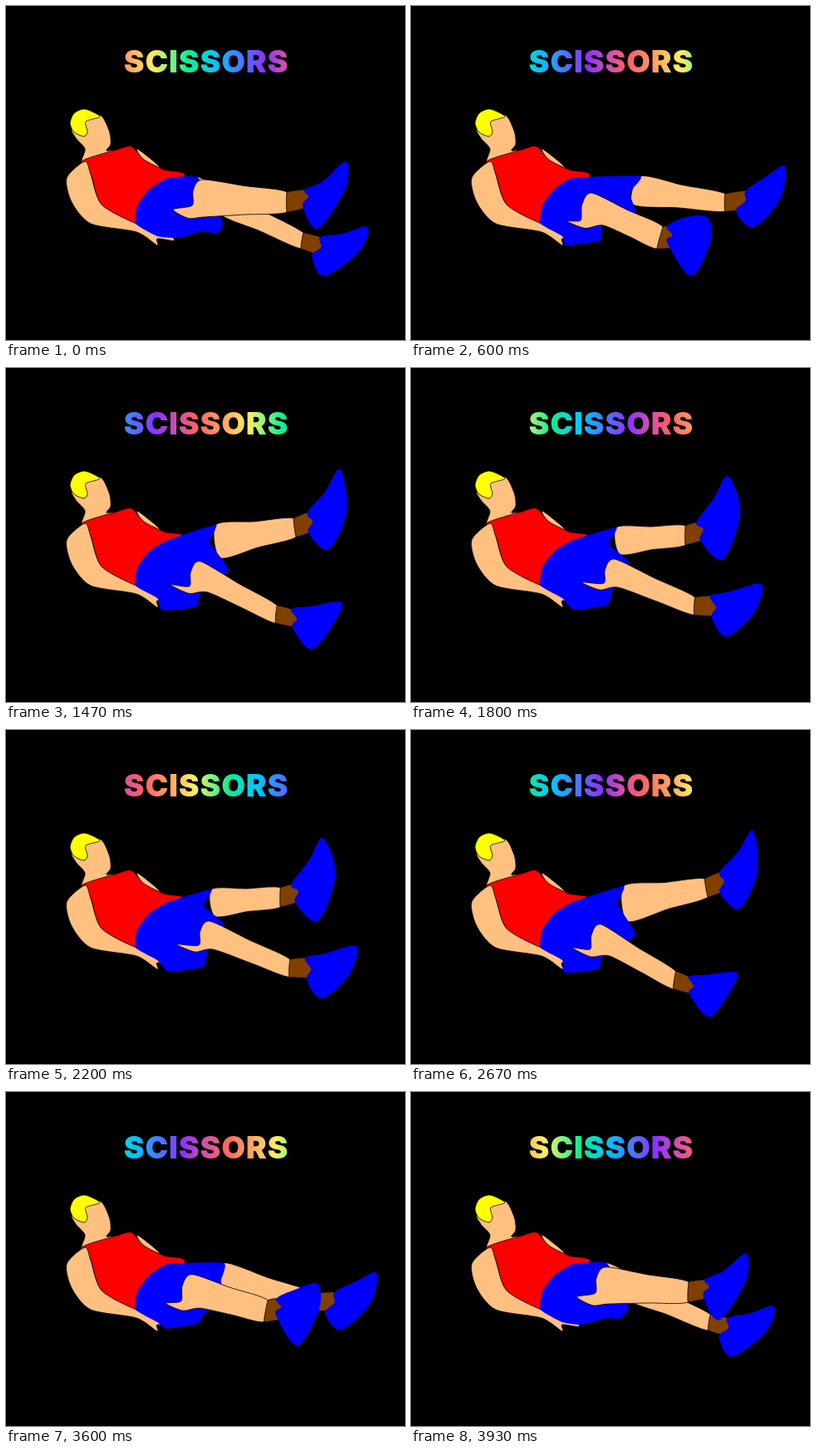
An HTML page with a canvas for the animation above (3990 ms loop, 480x402 px).

```html
<!DOCTYPE html>
<html lang="en">
<head>
<meta charset="utf-8">
<title>Scissors</title>
<style>
html, body { margin: 0; height: 100%; overflow: hidden; background: #000; }
canvas { display: block; }
</style>
</head>
<body>
<canvas id="stage" width="480" height="402"></canvas>
<script>
const ctx = document.getElementById('stage').getContext('2d');
const LOOP = 3990, STEP = 66.5, PERIOD = 245;
const SKIN = '#ffc080', RED = '#f00', BLUE = '#00f', BROWN = '#804000', YELLOW = '#ff0';

// Resting body
const head = [112,131, 124,150, 126,166, 121,174, 134,174, 112,190, 91,189, 95,172, 84,159, 80,146];
const hair = [77,141, 82,129, 95,124, 113,133, 96,139, 98,151, 94,157, 82,152];
const farArm = [158,172, 180,189, 187,198, 164,184];
const shirt = [91,187, 133,173, 151,169, 166,185, 190,197, 215,206, 156,262, 115,240, 102,203];
const arm = [95,187, 73,207, 79,236, 102,262, 157,272, 182,288, 182,280, 203,282, 184,266, 157,262, 115,239, 102,203];
const waist = [182,277, 156,262, 158,240, 172,221, 195,207];

// Control points of the moving parts at the key times
const keys = [0, 600, 720, 1130, 1320, 1800];
// far hem top, middle, bottom; near hem right, bottom right, bottom left
const hem = [
  [230,206, 248,235, 261,261, 254,274, 236,271, 208,279],
  [276,205, 263,225, 270,250, 231,264, 228,282, 186,288],
  [273,200, 261,224, 269,255, 227,271, 224,284, 180,291],
  [267,191, 260,212, 271,249, 224,272, 220,286, 178,294],
  [256,188, 249,210, 270,247, 230,273, 225,288, 184,292],
  [247,192, 238,212, 262,234, 243,266, 237,285, 196,291]
];
const farAnkle = [
  [358,273, 355,292], [378,226, 378,247], [378,213, 378,233],
  [371,188, 374,208], [354,179, 358,201], [330,190, 330,213]
];
// ankle, instep, toe, sole, heel, back
const farShoe = [
  [378,278, 405,274, 435,266, 425,295, 383,325, 368,301],
  [403,222, 430,203, 450,193, 444,232, 412,266, 391,247],
  [402,209, 425,188, 447,174, 443,210, 415,250, 392,230],
  [390,180, 415,158, 433,135, 434,172, 412,219, 390,200],
  [372,171, 394,147, 412,121, 417,172, 395,215, 372,196],
  [343,186, 364,157, 381,130, 396,174, 375,230, 348,208]
];
const nearShoe = [
  [359,221, 381,211, 409,187, 408,220, 375,268, 357,241],
  [308,265, 332,254, 357,255, 360,284, 337,325, 308,285],
  [297,287, 320,279, 345,280, 345,308, 324,343, 297,312],
  [301,307, 320,309, 349,317, 345,341, 327,361, 300,328],
  [333,297, 357,295, 391,293, 381,318, 358,346, 334,318],
  [360,274, 383,269, 422,260, 413,294, 380,323, 362,300]
];
// knee, ankle top, ankle bottom, thigh at hem, hem tip, hem fold
const nearLeg = [
  [236,209, 338,224, 338,248, 238,254, 201,245, 224,240],
  [217,225, 303,266, 296,292, 231,264, 188,259, 204,258],
  [213,230, 294,283, 284,307, 228,270, 186,262, 201,263],
  [217,236, 299,302, 288,323, 225,273, 185,264, 203,264],
  [228,234, 318,291, 315,312, 238,272, 194,262, 215,264],
  [245,230, 342,276, 341,297, 249,264, 206,258, 232,259]
];
const rainbow = ['#ff5f64', '#ff9c60', '#ffee60', '#80f480', '#10f090', '#00c8ff', '#4080ff', '#9030ff', '#d04fb0', '#ff5f64'];
const stops = [0, .12, .25, .34, .42, .56, .67, .8, .9, 1];

// Hermite interpolation through the keys, straight on past the last one; gives [x, y] pairs
function pose(part, u) {
  const last = keys.length - 1;
  const i = keys.findLastIndex(k => k <= u);
  const slope = (k, n) => {
    const a = Math.max(k - 1, 0), b = Math.min(k + 1, last);
    return (part[b][n] - part[a][n]) / (keys[b] - keys[a]);
  };
  if (i === last) return pairs(part[last].map((v, n) => v + slope(last, n) * (u - keys[last])));
  const d = keys[i + 1] - keys[i], s = (u - keys[i]) / d, r = 1 - s;
  return pairs(part[i].map((v, n) =>
    v * r * r * (1 + 2 * s) + part[i + 1][n] * s * s * (3 - 2 * s) +
    d * s * r * (slope(i, n) * r - slope(i + 1, n) * s)));
}

function pairs(list) {
  return Array.from({ length: list.length / 2 }, (_, k) => [list[2 * k], list[2 * k + 1]]);
}

function mix(a, b, s = .5, dx = 0, dy = 0) {
  return [a[0] + (b[0] - a[0]) * s + dx, a[1] + (b[1] - a[1]) * s + dy];
}

// Closed, rounded outline through the points
function shape(color, p, round = .13) {
  const n = p.length, at = k => p[(k + n) % n];
  const ctrl = (k, dir) => [0, 1].map(c => at(k)[c] + dir * round * (at(k + 1)[c] - at(k - 1)[c]));
  ctx.beginPath();
  ctx.moveTo(...p[0]);
  for (let k = 0; k < n; k++) ctx.bezierCurveTo(...ctrl(k, 1), ...ctrl(k + 1, -1), ...at(k + 1));
  ctx.closePath();
  ctx.fillStyle = color;
  ctx.fill();
  if (color !== BLUE) ctx.stroke();
}

function foot(top, bottom, shoe) {
  const dent = mix(mix(shoe[5], shoe[0]), shoe[3], .12);
  shape(BROWN, [top, shoe[0], mix(dent, shoe[3], .1), mix(dent, shoe[4], .3), bottom], .04);
  shape(BLUE, [...shoe, dent], .16);
}

function legs(u) {
  const h = pose(hem, u);
  const [top, bottom] = pose(farAnkle, u);
  const [knee, ankle, ankleLow, thigh, tip, fold] = pose(nearLeg, u);
  const thighLow = mix(h[1], h[2], .55);
  shape(SKIN, [h[0], mix(h[0], top), top, bottom, mix(bottom, thighLow), thighLow]);
  foot(top, bottom, pose(farShoe, u));
  shape(BLUE, [...pairs(waist), ...h], .08);
  shape(SKIN, [knee, mix(knee, ankle), ankle, ankleLow, mix(ankleLow, thigh), thigh,
    mix(thigh, tip, .5, 0, 6), tip, fold, mix(fold, knee, .5, -5, -2)]);
  foot(ankle, ankleLow, pose(nearShoe, u));
}

function title(t) {
  const x = (115 + 4 * PERIOD * t / LOOP) % PERIOD - PERIOD;
  const fill = ctx.createLinearGradient(x, 0, x + 3 * PERIOD, 0);
  for (let k = 0; k < 3; k++)
    rainbow.forEach((color, j) => fill.addColorStop((k + stops[j]) / 3, color));
  ctx.fillStyle = fill;
  ctx.font = '900 37px Inter, sans-serif';
  ctx.letterSpacing = '1px';
  ctx.textAlign = 'center';
  ctx.fillText('SCISSORS', 241, 80);
}

function draw(now) {
  const t = Math.floor(now % LOOP / STEP) * STEP;
  ctx.fillStyle = '#000';
  ctx.fillRect(0, 0, 480, 402);
  ctx.lineWidth = .8;
  title(t);
  shape(SKIN, pairs(head));
  shape(YELLOW, pairs(hair));
  shape(SKIN, pairs(farArm));
  shape(RED, pairs(shirt));
  shape(SKIN, pairs(arm));
  legs(Math.min(t, LOOP - t));   // out and back
}

const start = performance.now();
function tick() {
  draw(performance.now() - start);
  requestAnimationFrame(tick);
}
tick();
</script>
</body>
</html>
```
